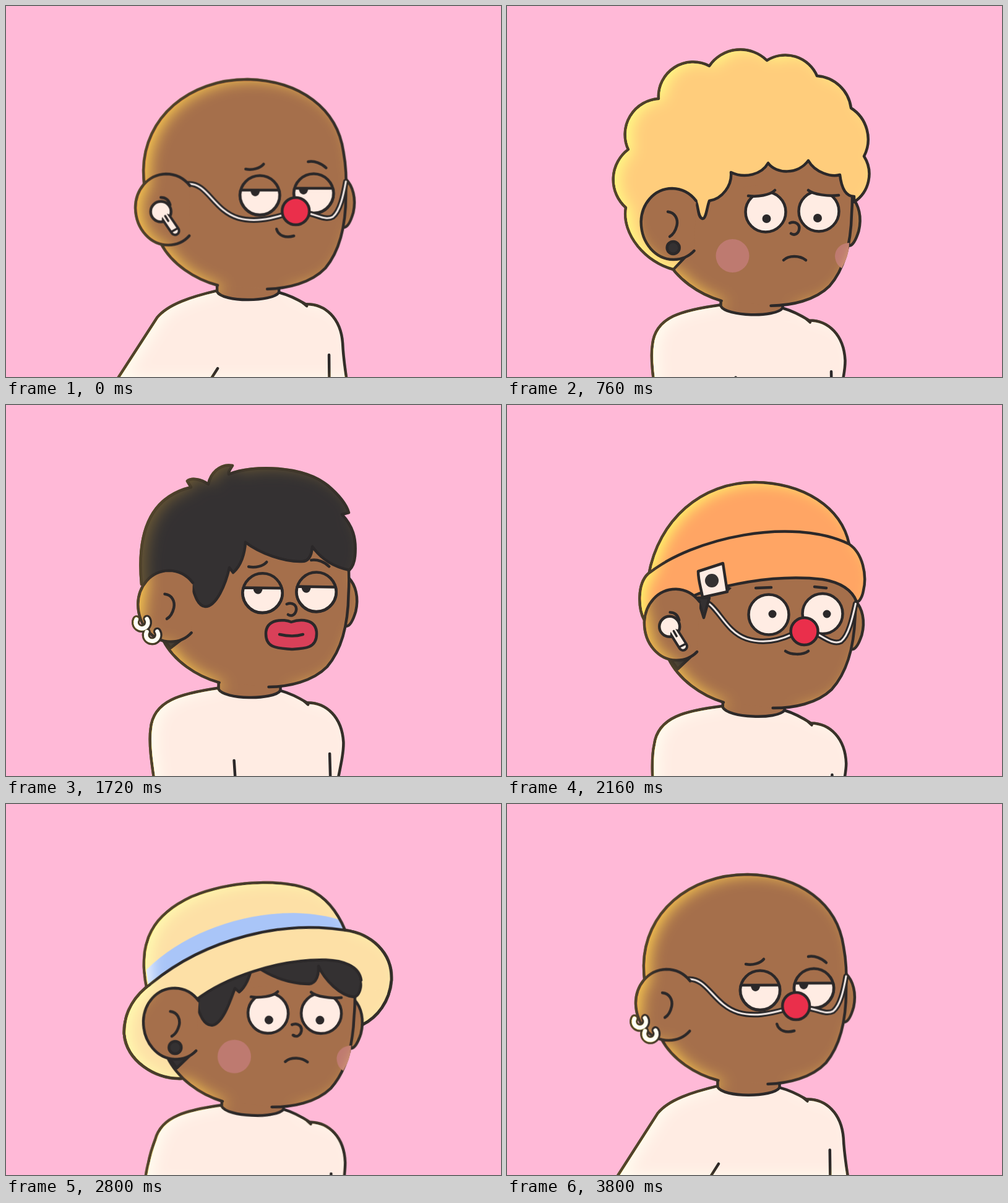
Animation, 800 px wide and 600 px high, one loop 3840 ms. Source, as an HTML page:

```html
<!DOCTYPE html>
<html lang="en">
<head>
<meta charset="utf-8">
<title>Dancing character</title>
<style>
  html, body { margin: 0; width: 100%; height: 100%; overflow: hidden; background: #ffb9d7; }
  svg { display: block; width: 800px; height: 600px; }
  path, circle { fill: none; stroke: #2b2829; stroke-width: 4.5; stroke-linecap: round; stroke-linejoin: round; }
  .skin { fill: #a56f4b; }
  .cream { fill: #ffece3; }
  .dark { fill: #343132; }
  .ink { fill: #2b2829; stroke: none; }
  .orange { fill: #ffa564; }
  .straw { fill: #fde0a6; }
  .blush { fill: #be7a70; }
  .flat { stroke: none; }
  [data-slot] { display: none; }
  [data-slot].on { display: inline; }
</style>
</head>
<body>
<svg viewBox="0 0 800 600">
  <defs>
    <filter id="rim" filterUnits="userSpaceOnUse" x="60" y="-60" width="680" height="800" color-interpolation-filters="sRGB">
      <feGaussianBlur in="SourceAlpha" stdDeviation="12"/>
      <feOffset dx="11" dy="2" result="core"/>
      <feFlood flood-color="rgb(135,118,15)"/>
      <feComposite operator="out" in2="core"/>
      <feComposite operator="in" in2="SourceAlpha" result="glow"/>
      <feBlend mode="color-dodge" in="glow" in2="SourceGraphic"/>
    </filter>
  </defs>
  <g filter="url(#rim)">
    <g id="figure">
      <!-- far brim -->
      <g data-slot="hat" data-name="straw"><g data-at="240">
        <path class="straw" d="M283 444C240 445 195 415 191 372C190 335 210 308 235 290C325 216 450 188 548 204C590 210 625 240 623 285C620 320 600 345 576 357Z"/>
      </g></g>

      <!-- body -->
      <g id="body">
        <path id="shirt" class="cream"/>
        <path id="pits"/>
        <path d="M480 480L486 485"/>
        <path class="skin flat" d="M341 435V462C350 479 430 479 441 463V435Z"/>
        <path d="M341 452V462C350 479 430 479 441 463V457"/>
      </g>
      <path class="skin" d="M549 279C560 290 566 310 561 333C557 347 552 356 547 357"/>
      <path class="skin" d="M342 451C305 441 268 417 250 383C235 350 222 310 222 265C223 180 295 118 390 118C475 120 535 165 545 235C550 262 550 285 549 305C549 350 540 394 516 423C493 447 455 456 422 457"/>

      <!-- eyes and mouths -->
      <g data-slot="mood" data-name="sleepy">
        <circle class="skin" cx="410" cy="305.5" r="32"/>
        <path class="cream" d="M379 297A32 32 0 1 0 441 297Z"/>
        <path class="ink" d="M395 298A7.5 9 0 0 0 410 298Z"/>
        <circle class="skin" cx="497" cy="302.5" r="32"/>
        <path class="cream" d="M466 294A32 32 0 1 0 528 294Z"/>
        <path class="ink" d="M473 295A7.5 9 0 0 0 488 295Z"/>
        <path d="M387 263C398 265 410 262 416 255M488 251C498 249 510 254 517 261"/>
        <path class="mouth" d="M437 360C440 371 452 375 465 371"/>
      </g>
      <g data-slot="mood" data-name="calm"><g data-at="240">
        <circle class="cream" cx="423" cy="339" r="32.5"/>
        <circle class="cream" cx="510" cy="337.5" r="32.5"/>
        <circle class="ink" cx="429" cy="338" r="6.5"/>
        <circle class="ink" cx="517" cy="338" r="6.5"/>
        <path d="M402 296L427 295M497 294L516 296"/>
        <path class="mouth" d="M450 398C458 404 478 405 487 398"/>
      </g></g>
      <g data-slot="mood" data-name="sad"><g data-at="120">
        <circle class="cream" cx="418" cy="333" r="32.5"/>
        <circle class="cream" cx="504" cy="332" r="32.5"/>
        <circle class="ink" cx="419.5" cy="344" r="7"/>
        <circle class="ink" cx="502" cy="343" r="7"/>
        <path class="skin flat" d="M382 292L390 307C405 309 425 306 433 298V288ZM487 298C495 305 520 308 536 306L540 290H487Z"/>
        <path d="M390 307C405 309 425 306 433 298M487 298C495 305 520 308 536 306"/>
        <path class="mouth" d="M447 411C455 403 473 403 483 411"/>
      </g></g>
      <g data-slot="mood" data-name="angry"><g data-at="120">
        <circle class="cream" cx="418" cy="333" r="32.5"/>
        <circle class="cream" cx="504" cy="332" r="32.5"/>
        <circle class="ink" cx="426" cy="329" r="5.5"/>
        <circle class="ink" cx="494.5" cy="327.5" r="5.5"/>
        <path class="skin flat" d="M396 297L446 311L450 298L420 288ZM487 312L525 296L502 288L480 298Z"/>
        <path d="M396 297L444 310M489 311L525 296"/>
        <path class="mouth" d="M447 392C453 382 473 380 482 391"/>
      </g></g>

      <!-- face extras -->
      <g id="nose" data-at="120"><path d="M457 351C467 347 474 354 472 362C470 370 463 371 459 368"/></g>
      <g data-slot="extra" data-name="ball">
        <path class="strap" style="stroke-width:9"/>
        <path class="strap" style="stroke-width:3;stroke:#eee5e2"/>
        <circle cx="468" cy="331" r="22" style="fill:#ea2f4b"/>
      </g>
      <g data-slot="extra" data-name="blush"><g data-at="120">
        <circle class="blush flat" cx="364.5" cy="404" r="27"/>
        <path class="blush flat" d="M553 383C538 384 530 394 530 405C531 416 536 421 541 424C550 408 553 395 553 383Z"/>
      </g></g>
      <g data-slot="extra" data-name="plaster"><g data-at="120">
        <path style="stroke-width:38" d="M362 402C373 415 387 424 404 432"/>
        <path style="stroke-width:30;stroke:#efc3b0" d="M362 402C373 415 387 424 404 432"/>
        <path style="stroke-width:30;stroke:#fba48c;stroke-linecap:butt" d="M371 411C379 418 386 423 393 427"/>
      </g></g>
      <g data-slot="extra" data-name="lips"><g data-at="440">
        <path style="fill:#d94059" d="M461 351C450 346 420 345 420 370C420 394 440 393 461 395C482 394 502 394 502 370C502 345 475 346 461 351Z"/>
        <path d="M442 371C455 374 470 374 480 371"/>
      </g></g>

      <!-- hair and hats -->
      <g data-slot="hat" data-name="curls"><g data-at="120">
        <path style="fill:#ffcd7c" d="M269 426C225 415 185 370 192 326A61 61 0 0 1 196 232A58 58 0 0 1 245 150A56 56 0 0 1 327 97A61 61 0 0 1 420 88A56 56 0 0 1 501 113A60 60 0 0 1 556 165A60 60 0 0 1 577 243A54 54 0 0 1 561 317V308C545 308 540 290 538 273C525 277 498 270 487 250C470 273 435 272 422 254C412 272 385 280 362 269C364 290 348 312 327 315C323 325 322 344 316 344C308 342 310 325 305 315L288 322V406Z"/>
      </g></g>
      <g data-slot="hat" data-name="crop"><g data-at="440">
        <path class="dark" d="M219 290C212 215 228 150 299 133L293 123C300 117 315 120 327 128C330 112 345 94 366 98C362 104 359 108 360 112C400 96 480 98 520 130C540 147 550 160 554 174L543 177C560 195 567 215 564 245C563 255 560 262 555 267C530 262 510 250 495 229C494 245 488 253 478 253C450 254 410 240 387 222C386 240 380 260 367 271L361 263C355 290 340 326 322 326C308 325 303 300 299 288L250 305Z"/>
        <path class="dark" d="M252 377L266 393L284 379Z"/>
      </g></g>
      <g data-slot="hat" data-name="beanie"><g data-at="240">
        <path class="dark" d="M263 410L276 427L296 408ZM308 312H327L318 344Z"/>
        <path class="orange" d="M229 275C245 185 315 125 400 125C480 126 540 165 553 225L400 250Z"/>
        <path class="orange" d="M228 273C300 215 460 180 553 225C575 240 582 275 576 300C574 312 568 320 565 318C558 300 540 287 510 282C440 274 370 287 310 305L250 330L222 348C212 330 210 290 228 273Z"/>
        <path class="cream" d="M309 269L349 256L356 302L316 311C314 297 309 285 309 269Z"/>
        <path class="ink" d="M354 292L363 296L356 303Z"/>
        <circle class="dark flat" cx="331" cy="284" r="11"/>
      </g></g>
      <g data-slot="hat" data-name="straw"><g data-at="240">
        <path class="dark" d="M263 410L276 427L296 408ZM306 312C312 345 322 358 333 358C350 356 362 320 370 298L377 304C388 295 393 280 397 266ZM408 265C430 280 460 291 490 291C502 290 506 275 505 262C515 285 540 310 562 312C570 312 574 300 574 285C572 262 550 252 510 252C470 253 440 257 408 265Z"/>
        <path class="straw flat" d="M236 290C325 216 450 188 548 204C600 215 620 250 620 285C610 300 592 308 576 300C577 265 555 253 510 252C440 252 355 280 307 317L215 345Z"/>
        <path d="M307 317C355 280 440 252 510 252C545 252 571 262 574 285"/>
        <path class="straw flat" d="M227 295C212 220 240 178 300 150C360 125 440 120 490 138C520 152 538 180 548 204C450 188 325 216 232 293Z"/>
        <path class="flat" style="fill:#a9c5f8" d="M227 268C305 190 445 157 541 188L548 204C450 188 325 216 230 295Z"/>
        <path d="M227 295C212 220 240 178 300 150C360 125 440 120 490 138C520 152 538 180 548 204"/>
        <path d="M283 444C240 445 195 415 191 372C190 335 210 308 235 290C325 216 450 188 548 204C590 210 625 240 623 285C620 320 600 345 576 357"/>
      </g></g>
      <g data-slot="hat" data-name="cap"><g data-at="120">
        <path class="dark" d="M259 406L271 422L294 403ZM272 300L308 272L327 290L314 342L304 316ZM541 246L552 244L553 270C545 270 542 258 541 246Z"/>
        <path class="cream" d="M314 148C311 130 330 124 347 126C352 129 352 132 350 135Z"/>
        <path class="cream" d="M228 322C216 255 245 175 313 148C335 135 365 126 410 126C490 128 540 170 551 232L308 274L275 298L245 322Z"/>
        <path d="M308 274C285 250 282 195 297 168C306 154 326 143 340 136"/>
        <path style="fill:#ead9cf" d="M553 243C590 250 612 270 613 285C612 300 590 300 561 298Z"/>
        <path class="cream" d="M308 276C360 250 450 208 535 226C580 235 610 262 613 283C610 292 607 290 605 284C598 265 580 250 553 245C500 245 450 265 415 288C380 302 335 295 308 276Z"/>
        <circle class="dark flat" cx="475" cy="192" r="12"/>
      </g></g>

      <!-- near ear -->
      <path class="skin" d="M297 290C285 275 270 271 258 271C228 272 209 298 209 326C210 362 235 386 262 386C278 386 288 380 296 371"/>
      <path id="fold" d="M252 309C264 310 269 321 267 331C265 340 261 346 256 349"/>
      <g data-slot="ear" data-name="pod">
        <path d="M250 309C258 309 263 314 265 321"/>
        <circle class="cream" cx="250" cy="332" r="16.5"/>
        <path style="stroke-width:17" d="M260 344L273 363"/>
        <path style="stroke-width:9;stroke:#ffece3" d="M256 338L273 363"/>
        <path style="stroke-width:3.5" d="M257 339L262 347M268 364L277 359"/>
      </g>
      <g data-slot="ear" data-name="stud"><circle class="dark" cx="262" cy="367" r="10"/></g>
      <g data-slot="ear" data-name="gem">
        <circle style="fill:#eef1f3" cx="263.5" cy="367" r="11.5"/>
        <path style="stroke:#c3cbd2;stroke-width:2" d="M258 363L263 369L269 363M263 369V375"/>
      </g>
      <g data-slot="ear" data-name="hoops"><g data-at="600">
        <path style="stroke-width:13" d="M223 346A10 10 0 1 1 206 347M240 366A10 10 0 1 1 223 367"/>
        <path style="stroke-width:6.5;stroke:#fffcf2" d="M223 346A10 10 0 1 1 206 347M240 366A10 10 0 1 1 223 367"/>
      </g></g>
    </g>
  </g>
</svg>
<script>
const LOOP = 3840, BEAT = 640, STEP = 40, TAU = 2 * Math.PI;
const HATS = ['none', 'crop', 'curls', 'beanie', 'crop', 'crop', 'cap', 'beanie', 'curls', 'straw', 'cap', 'straw'];
const MOODS = ['sleepy', 'calm', 'sad', 'angry'];
const EARS = ['pod', 'stud', 'gem', 'hoops'];
const EXTRAS = [[0, 'ball'], [480, 'blush'], [960, 'plaster'], [1600, 'lips'], [1840, 'ball']];

const $ = id => document.getElementById(id);
const slots = [...document.querySelectorAll('[data-slot]')];
const mouths = document.querySelectorAll('.mouth');
const straps = document.querySelectorAll('.strap');

// Bob and lean for a moment in the beat.
function pose(t) {
  const a = t / BEAT * TAU;
  return {
    y: 12.9 + 21.2 * Math.sin(a - 0.085 * TAU) + 1.5 * Math.cos(3 * (a - 0.1875 * TAU)),
    lean: 1.05 + 1.235 * Math.sin(a - 0.15 * TAU)
  };
}

// Parts drawn mid-beat are brought back to the rest pose.
for (const g of document.querySelectorAll('[data-at]')) {
  const { y, lean } = pose(+g.dataset.at);
  g.setAttribute('transform', `rotate(${-lean} 400 650) translate(0 ${-y})`);
}

// Arms swing out once every two beats.
function drawArms(t) {
  const c = 0.5 + 0.5 * Math.cos((t / (2 * BEAT) + 0.015) * TAU);
  const out = c ** 2.5;
  const mix = (a, b) => (a + (b - a) * out).toFixed(2);
  $('shirt').setAttribute('d',
    `M${mix(248, 143)} 660C${mix(242, 177)} ${mix(615, 608)} ${mix(228, 210)} ${mix(560, 556)} ${mix(232, 244)} ${mix(528, 504)}` +
    `C${mix(235, 262)} ${mix(482, 482)} ${mix(279, 300)} ${mix(470, 470)} 342 460` +
    `L441 463C460 468 474 476 484 482C516 481 541 505 544 545C545 570 ${mix(534, 550)} 605 ${mix(526, 560)} 660Z`);
  $('pits').setAttribute('d',
    `M${mix(368, 342)} ${mix(577, 586)}L${mix(374, 304)} 645M522 564L${mix(526, 523)} 660`);
}

// The elastic hangs lower as the head drops.
function drawStrap(sag) {
  const d = `M294 287C325 285 335 ${330 + sag} 375 ${342 + sag}C400 ${349 + sag} 425 ${344 + sag} 448 337` +
    `M490 335C505 ${338 + sag} 517 ${346 + sag} 528 ${340 + sag}C540 ${330 + sag} 545 305 549 283`;
  for (const s of straps) s.setAttribute('d', d);
}

function draw(t) {
  const half = t % (LOOP / 2);
  const show = {
    hat: HATS[Math.floor((t + 120) / 320) % HATS.length],
    mood: MOODS[Math.floor((half + 320) / 480) % 4],
    ear: EARS[Math.floor(half / 480)],
    extra: EXTRAS.filter(e => half >= e[0]).pop()[1]
  };
  for (const g of slots) g.classList.toggle('on', show[g.dataset.slot] === g.dataset.name);
  $('nose').style.display = show.extra === 'ball' ? 'none' : '';
  $('fold').style.display = show.ear === 'pod' ? 'none' : '';
  for (const m of mouths) m.style.display = show.extra === 'lips' ? 'none' : '';

  const { y, lean } = pose(t);
  $('figure').setAttribute('transform', `translate(0 ${y}) rotate(${lean} 400 650)`);
  $('body').setAttribute('transform', `translate(0 ${-0.5 - 0.08 * y})`);
  drawArms(t);
  drawStrap(0.15 * y);
}

const start = performance.now();
let last = -1;
function tick() {
  const t = Math.floor((performance.now() - start) / STEP + 0.01) * STEP % LOOP;
  if (t !== last) draw(last = t);
  requestAnimationFrame(tick);
}
tick();
</script>
</body>
</html>
```
